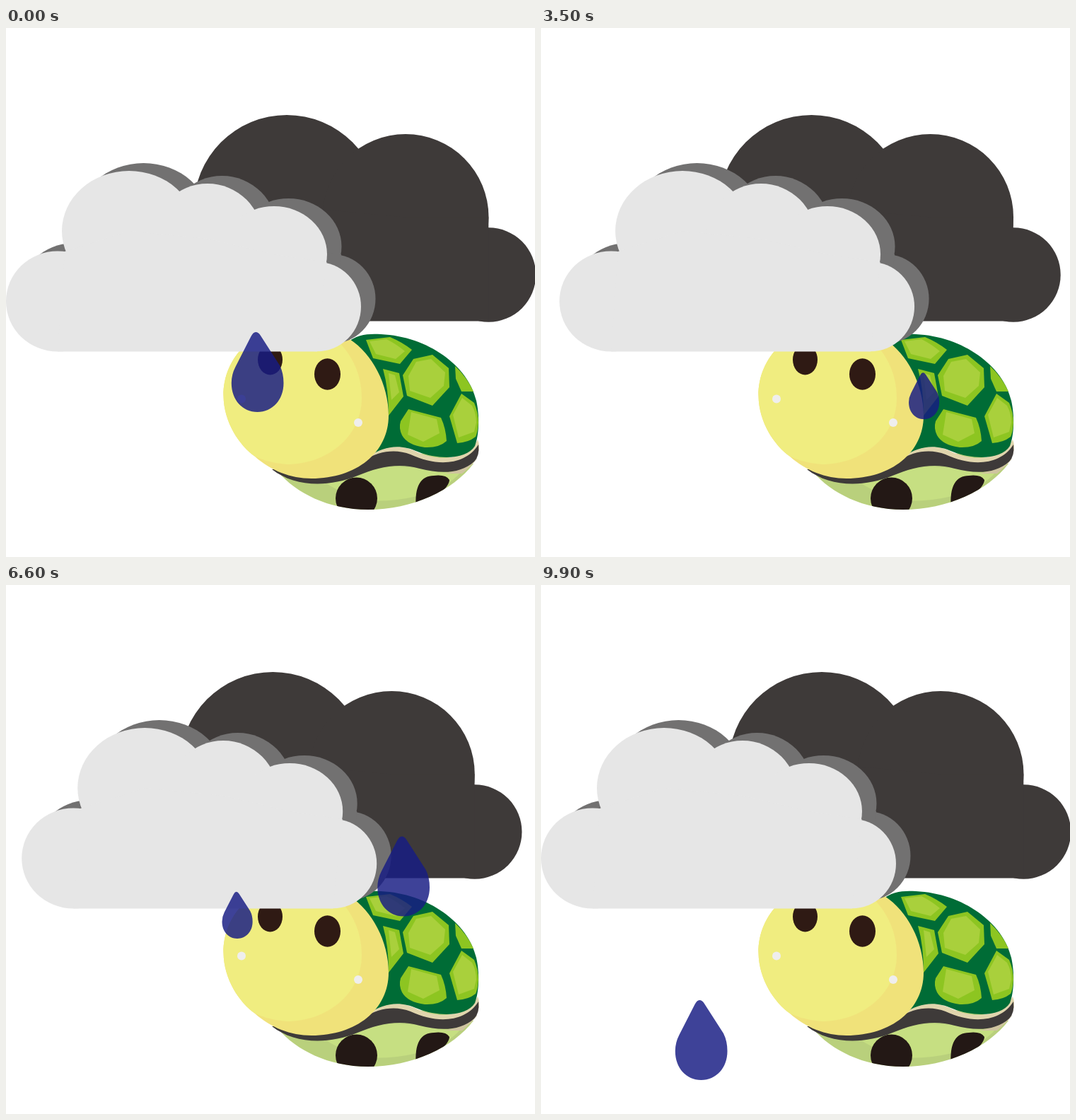
An HTML page with a canvas that plays this animation: 748x748 px, repeating every 10000 ms.

```html
<!DOCTYPE html>
<html lang="en">
<head>
<meta charset="utf-8">
<title>Turtle under rain clouds</title>
<style>
html, body { margin: 0; width: 100%; height: 100%; overflow: hidden; background: #fff; }
canvas { display: block; width: 748px; height: 748px; }
</style>
</head>
<body>
<canvas id="stage" width="748" height="748"></canvas>
<script>
const ctx = document.getElementById('stage').getContext('2d');
const LOOP = 10, STEP = 0.1, LAST = 9.9;

function shape(d, color) {
  ctx.fillStyle = color;
  ctx.fill(new Path2D(d));
}

function oval(x, y, rx, ry, color) {
  ctx.fillStyle = color;
  ctx.beginPath();
  ctx.ellipse(x, y, rx, ry, 0, 0, Math.PI * 2);
  ctx.fill();
}

function shifted(dx, dy, draw) {
  ctx.save();
  ctx.translate(dx, dy);
  draw();
  ctx.restore();
}

// Outer and inner outline of each shell plate
const plates = [
  ['M509 441 L543 437 Q560 444 574 455 L557 475 L519 467 Z',
   'M514 443 L538 440 Q552 447 564 457 L551 468 L523 461 Z'],
  ['M576 468 L603 462 L626 481 L627 508 L603 534 L567 520 L561 491 Z',
   'M580 472 L601 468 L621 487 L619 506 L600 523 L571 513 L569 492 Z'],
  ['M569 539 L615 551 Q622 566 623 584 Q612 594 592 593 Q568 590 560 576 Q555 566 558 556 Z',
   'M573 543 L609 553 L613 573 L590 585 L568 575 Z'],
  ['M644 517 L662 530 Q668 544 668 558 Q667 572 664 578 Q654 586 638 587 L627 549 Z',
   'M645 523 L659 534 Q665 545 665 558 L662 571 L640 579 L632 547 Z'],
  ['M533 482 L556 488 L562 521 L541 548 Q541 510 533 482 Z',
   'M541 488 L550 491 L556 515 L545 526 Z'],
  ['M635 478 Q652 494 661 514 L644 514 L636 496 Z', '']
];

function turtle() {
  // belly and feet
  const belly = 'M385 628 C410 657 455 681 512 681 C575 681 632 654 661 616 L600 600 Z';
  shape(belly, '#b9d07c');
  ctx.save();
  ctx.clip(new Path2D(belly));
  shape('M450 642 Q505 624 550 620 L645 626 Q633 640 612 653 Q560 671 515 668 Q478 661 450 642 Z', '#c6df82');
  oval(495.5, 665, 29.5, 29.5, '#231815');
  shape('M580 680 C577 647 587 633 605 633 Q622 631 627 639 Q627 647 610 662 Z', '#231815');
  ctx.restore();

  // rim
  shape('M620 630 Q650 624 667 608 Q658 619 645 630 Z', '#cfc49f');
  shape('M514 603 C535 586 558 589 580 599 C612 614 650 611 667 582 Q671 591 667 603 L645 620 L520 618 Z', '#e0d5ad');
  shape('M376 624 L505 612 C528 597 552 595 572 603 C610 621 650 618 668 589 '
    + 'Q670 605 662 613 C643 630 616 631 585 623 C555 614 525 621 497 633 C455 650 408 649 376 624 Z', '#3e3a39');

  // shell
  shape('M480 446 C497 433 512 432 530 433 C597 436 654 478 665 527 C670 549 669 576 663 591 '
    + 'C652 609 615 612 582 599 C556 587 534 592 514 605 L480 560 Z', '#006c36');
  for (const [outer, inner] of plates) {
    shape(outer, '#8dc521');
    shape(inner, '#a9d03c');
  }

  // head
  const head = 'M415 420 C352 420 307 465 307.5 520 C308 558 330 590 352 606 '
    + 'C375 626 402 637 432 637 C496 637 541 600 541 548 C541 504 518 461 486 440 Q455 420 415 420 Z';
  shape(head, '#f0e27a');
  ctx.save();
  ctx.clip(new Path2D(head));
  shape('M300 420 L440 420 C485 447 503 485 503 523 C503 579 453 617 397 617 Q367 615 345 602 L300 602 Z', '#f0ed80');
  ctx.restore();
  oval(373.5, 469, 17.5, 21.5, '#2f1a14');
  oval(454.5, 489.5, 18.5, 22.3, '#2f1a14');
  oval(333, 524.5, 6, 6, '#efeeee');
  oval(498, 558, 6, 6, '#efeeee');
}

function darkCloud() {
  const c = '#3e3a39';
  oval(397, 254.5, 131.5, 131.5, c);
  oval(565, 267.5, 117.5, 117.5, c);
  oval(682.5, 349, 66.7, 66.7, c);
  shape('M398 252 L565 267.5 H682.3 V414.5 H398 Z', c);
}

function puffs(c) {
  oval(73, 386.5, 73, 71, c);
  oval(174, 287, 95, 85, c);
  oval(285, 298, 78, 78, c);
  oval(379, 320, 75, 68, c);
  oval(440, 394, 62, 63.3, c);
  shape('M83 316 L174 287 L285 298 L379 320 L453.5 331 L440 457.4 H73 Z', c);
}

function frontCloud() {
  shifted(20.5, -11, () => puffs('#727171'));
  puffs('#e6e6e6');
}

// Tip up, bottom at the origin
const dropPath = new Path2D('M-2.5 -113 Q1.5 -113 4.5 -108 L31.5 -66 Q37 -55 37 -41 '
  + 'C37 -17 21 0 0 0 C-21 0 -36.7 -17 -36.7 -41 Q-36.7 -53 -31 -64 L-9 -107 Q-6 -113 -2.5 -113 Z');

// x, size, first and last second, lowest bottom edge, fall length
const drops = [
  [355.5, 1, 0, 2.95, 700, 160],
  [161.5, 0.585, 0.4, 3.2, 675, 159],
  [541.5, 0.585, 1.5, 4.3, 692, 210],
  [667.5, 1.365, 3.6, 6.5, 693, 187],
  [327, 0.585, 5.8, 8.7, 692, 204],
  [562, 1, 6.6, 9.5, 692, 228],
  [226.5, 1, 7, 9.9, 700, 179]
];

function rain(t) {
  ctx.fillStyle = 'rgba(23, 28, 132, 0.83)';
  for (const [x, size, from, to, low, fall] of drops) {
    if (t < from - 0.01 || t > to + 0.01) continue;
    const y = low - fall * (1 - Math.exp(1.35 * (t - to)));
    ctx.save();
    ctx.translate(x, y);
    ctx.scale(size, size);
    ctx.fill(dropPath);
    ctx.restore();
  }
}

// Out to the peak and back, both at constant speed
function sway(t, peak, reach) {
  return reach * (t < peak ? t / peak : (LAST - t) / (LAST - peak));
}

function frame(now) {
  const t = Math.floor((now / 1000 % LOOP) / STEP + 1e-6) * STEP;
  ctx.fillStyle = '#fff';
  ctx.fillRect(0, 0, 748, 748);
  turtle();
  shifted(sway(t, 5.85, -24.2), 0, darkCloud);
  shifted(sway(t, 4.7, 35), 0, frontCloud);
  rain(t);
}

let start = null;
function tick(now) {
  if (start === null) start = now;
  frame(now - start);
  requestAnimationFrame(tick);
}
frame(0);
requestAnimationFrame(tick);
</script>
</body>
</html>
```
